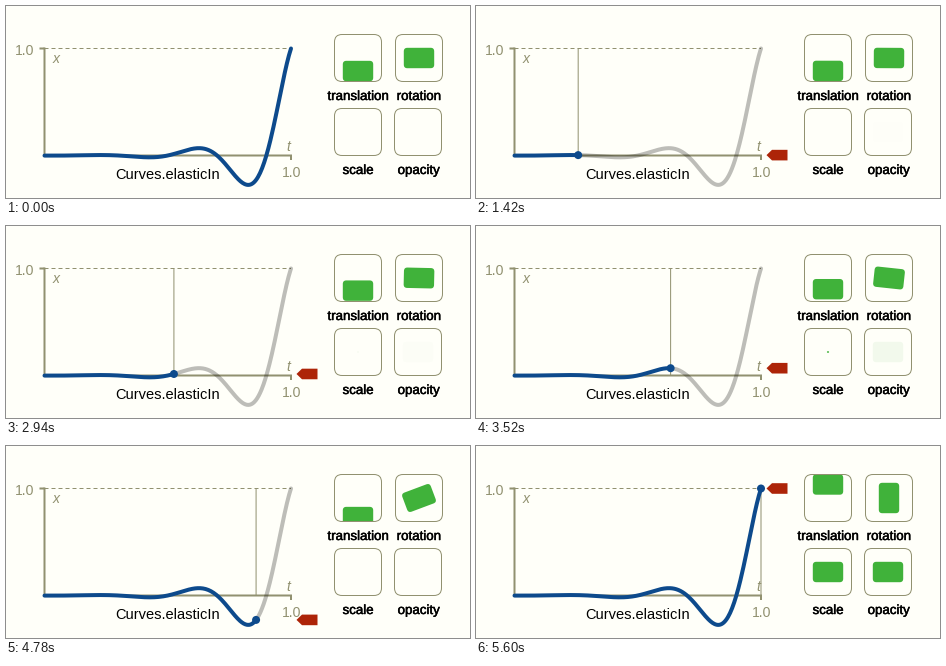
Recreate the animation shown at these times as a matplotlib script. Size 464 px wide and 192 px high, loop 5620 ms.

```python
import numpy as np
import matplotlib.pyplot as plt
from matplotlib.animation import FuncAnimation
from matplotlib.patches import Circle, FancyBboxPatch, Polygon
from matplotlib.patheffects import withStroke
from matplotlib.transforms import Affine2D

W, H, DPI = 464, 192, 80
PX = 72 / DPI
STEPS = 120

PAPER, OLIVE, INK = "#fffff9", "#919170", "#000000"
BLUE, GREEN, RED = "#0d4a8c", "#40b23a", "#ad2408"

LEFT, RIGHT, TOP, BASE = 38.5, 285, 42.5, 149.5

plt.rcParams["font.family"] = "Liberation Sans"
plt.rcParams["path.snap"] = False
fig = plt.figure(figsize=(W / DPI, H / DPI), dpi=DPI, facecolor=PAPER)
ax = fig.add_axes([0, 0, 1, 1])
ax.set(xlim=(0, W), ylim=(H, 0))
ax.axis("off")


def elastic_in(t, period=0.4):
    s = t - 1
    return -2 ** (10 * s) * np.sin((s - period / 4) * 2 * np.pi / period)


def to_x(t):
    return LEFT + (RIGHT - LEFT) * t


def to_y(v):
    return BASE - (BASE - TOP) * v


def line(xs, ys, color=OLIVE, width=2.0, cap="butt", **kw):
    return ax.plot(xs, ys, color=color, lw=width * PX,
                   solid_capstyle=cap, solid_joinstyle="round", **kw)[0]


def label(x, y, text, size=14, color=INK, **kw):
    return ax.text(x, y, text, fontsize=size * PX, color=color,
                   ha="center", va="baseline", **kw)


def rounded(x, y, w, h, r, **kw):
    style = f"round,pad=0,rounding_size={r}"
    return ax.add_patch(FancyBboxPatch((x, y), w, h, boxstyle=style, **kw))


def panel(x, y, name, name_x):
    """Outlined box with a green tile; returns the tile."""
    box = rounded(x, y, 47, 47, 7.5, fc="none", ec=OLIVE, lw=PX, zorder=4)
    tile = rounded(-15.2, -10.2, 30.4, 20.4, 3.5, fc=GREEN, ec="none", zorder=3)
    tile.set_clip_path(box)
    # A thin outline gives a medium weight
    text = label(name_x, y + 65.5, name, size=13.3)
    text.set_path_effects([withStroke(linewidth=0.5 * PX, foreground=INK)])
    return tile


# Axes, ticks and the dashed guide
line([LEFT, LEFT], [TOP - 1, BASE + 1])
line([LEFT - 1, RIGHT + 1], [BASE, BASE])
line([LEFT - 5, LEFT], [TOP, TOP])
line([RIGHT, RIGHT], [BASE, BASE + 4.5])
line([LEFT, RIGHT], [TOP, TOP], width=1, dashes=(4, 3))

label(18.5, 49, "1.0", color=OLIVE)
label(285.5, 171, "1.0", color=OLIVE)
label(50, 57, "x", color=OLIVE, style="italic")
label(282, 145, "t", color=OLIVE, style="italic")
label(161.5, 173, "Curves.elasticIn", size=14.6)

# Graph
rest = line([], [], color=(0, 0, 0, 0.26), width=4, cap="round", zorder=5)
done = line([], [], color=BLUE, width=4, cap="round", zorder=6)
guide = line([], [], width=1, zorder=4)
dot = ax.add_patch(Circle((0, 0), 4, fc=BLUE, ec="none", zorder=7))
arrow = ax.add_patch(Polygon([(0, 0)] * 5, fc=RED, ec="none", zorder=7))
ARROW = np.array([(290.5, 0), (296, -5.3), (311.5, -5.3), (311.5, 5.3), (296, 5.3)])

# Demo panels
slide = panel(328.5, 28.5, "translation", 352)
spin = panel(389.5, 28.5, "rotation", 412.7)
grow = panel(328.5, 102.5, "scale", 352)
fade = panel(388.5, 102.5, "opacity", 412.5)


def place(tile, x, y, scale=1.0, angle=0.0):
    move = Affine2D().scale(scale).rotate(angle).translate(x, y)
    tile.set_transform(move + ax.transData)


def trace(artist, t0, t1):
    t = np.linspace(t0, t1, 240)
    artist.set_data(to_x(t), to_y(elastic_in(t)))


def step_at(tick):
    # Holds of 20, 100 and 20 ms in turn
    group, phase = divmod(tick, 7)
    return 3 * group + (phase > 0) + (phase == 6)


def update(tick):
    step = step_at(tick)
    t = step / STEPS
    v = elastic_in(t)
    x, y = to_x(t), to_y(v)
    running = step > 0

    trace(done, 0, t if running else 1)
    trace(rest, t, 1)
    rest.set_visible(0 < step < STEPS)
    guide.set_data([x, x], [TOP, BASE])
    dot.center = x, y
    arrow.set_xy(ARROW + (0, y))
    for part in (guide, dot, arrow):
        part.set_visible(running)

    shown = float(np.clip(v, 0, 1))
    place(slide, 352, 65 - 26.5 * v)
    place(spin, 413, 52, angle=v * np.pi / 2)
    place(grow, 352, 126, scale=max(shown, 1e-4))
    grow.set_visible(shown > 0.005)
    place(fade, 412, 126)
    fade.set_alpha(shown)
    return done, rest, guide, dot, arrow, slide, spin, grow, fade


anim = FuncAnimation(fig, update, frames=281, interval=20,
                     repeat=True, repeat_delay=0, blit=False)
plt.show()
```
